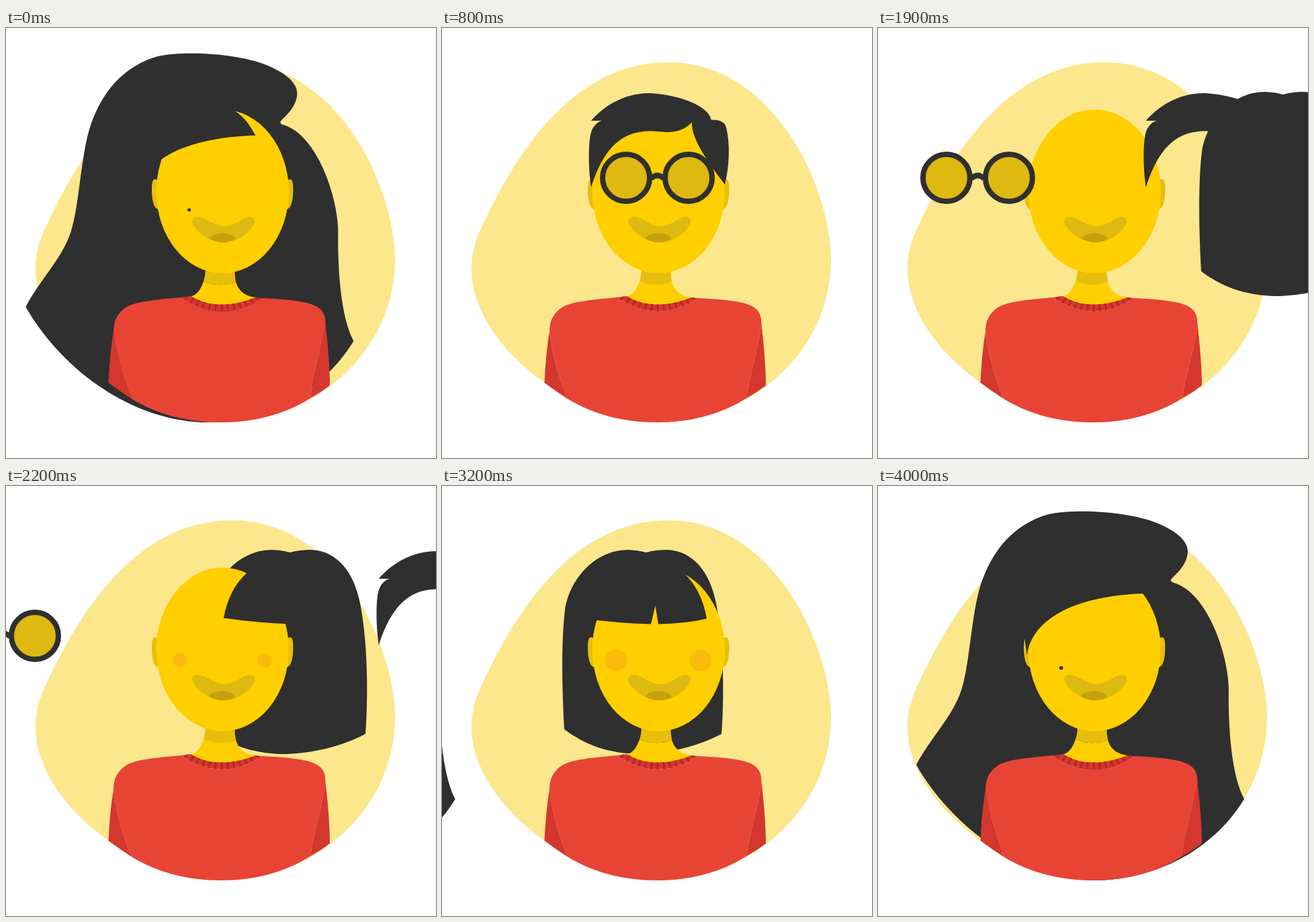
Write an HTML page with a canvas that moves like this. It is 640 by 640 pixels and loops after 4.8 s.

```html
<!DOCTYPE html>
<html lang="en">
<head>
<meta charset="utf-8">
<title>Hairstyles</title>
<style>
html, body { margin: 0; width: 100%; height: 100%; overflow: hidden; background: #fff; }
canvas { display: block; width: 640px; height: 640px; }
</style>
</head>
<body>
<canvas id="stage" width="640" height="640"></canvas>
<script>
const ctx = document.getElementById('stage').getContext('2d');
const path = d => new Path2D(d);

const HAIR = '#2f2f2f', SKIN = '#ffcf00', SHADE = '#e8be0d', MOUTH = '#deb912',
  TONGUE = '#c6a10d', SHIRT = '#e84436', SLEEVE = '#d4372e', RIB = '#b5252a',
  BLOB = '#fce78d', BLUSH = '#fabb0a';

const blob = path('M337 51C495 51 579 240 579 345C579 480 460 587 320 587' +
  'C195 587 44 470 44 360C44 340 47 325 53 310C107 187 195 51 337 51Z');

const body = {
  ear: path('M230 269C220 273 217 256 217 240C217 228 219 225 222 225L230 228Z'),
  neck: path('M294 377Q318 387 342 378C346 390 354 399 372 401L322 420L275 400C286 396 290 388 294 377Z'),
  neckShade: path('M297 355L340 355C340 363 341 370 342 378Q318 387 294 377C296 371 297 365 297 355Z'),
  torso: path('M261 401C225 404 195 407 180 415C165 424 160 437 160 452C164 485 172 515 187 552' +
    'C225 575 270 587 320 587C370 587 415 575 453 551C457 520 470 480 475.5 441' +
    'C476 420 465 412 440 407.500C420 404 400 403 380 402Q322 442 261 401Z'),
  leftSleeve: path('M160 452C156 475 154 500 152.500 528Q170 541 187 552C172 515 164 485 160 452Z'),
  rightSleeve: path('M475.500 441C479 470 482 505 482 532Q468 543 453 551C457 520 470 480 475.500 441Z'),
  collar: path('M261 401L275 399C290 408 305 411.500 321 411.500C340 411.500 356 407 371 401' +
    'L380 402Q322 442 261 401Z'),
  mouth: path('M286 281C297 281 310 295 325 295C342 295 352 281 362 281C369 281 372 286 369 292' +
    'C360 309 341 319 323 319C303 319 285 304 278 292C275 286 280 281 286 281Z'),
  tongue: path('M302 313C309 303 335 302 342 314C336 317 330 319 323 319C315 319 308 317 302 313Z')
};

const longHair = {
  back: path('M57 415C80 372 110 345 124 304C138 262 139 175 158 133C172 98 200 57 254 42' +
    'C300 33 375 39 415 55C440 65 461 80 461 97C461 115 447 128 437 138C435 140 436 143 440 144' +
    'C490 158 521 250 522 300C521 360 526 430 545 466C500 540 415 587 320 587' +
    'C205 582 105 500 57 415Z'),
  front: path('M222 253C225 215 265 165 395 160L399 160C391 145 382 132 369 124' +
    'L322 100L200 120L214 180L218 226Z')
};

const bob = {
  back: path('M205 362C201 290 201 225 206 185C212 140 250 95 300 95Q315 95.500 327 99' +
    'C337 96 347 95 357 95C400 96 422 133 430 170C441 220 444 300 439 369' +
    'C400 390 350 399 316 399C270 398 235 385 205 362Z'),
  front: path('M228 196.500Q280 204 334 205.500L340.500 178L345 205.500Q385 205 417 197.500' +
    'C412 168 400 145 383 130L340 100L300 100L262 130C245 145 233 168 228 196.500Z')
};

const crop = path('M222 138C240 117 270 97 308 97C340 98 395 111 401 137C413 136 421 140 423 148' +
  'C429 172 428 205 421 233C400 205 370 165 372 140Q359 155 335 155C318 154 312 153 300 154' +
  'C255 158 235 197 222 237C218 210 218 180 220 165C222 148 229 141 238 138Z');

const bridge = path('M311 224Q320.500 215 330 224');

function fill(shape, color) {
  ctx.fillStyle = color;
  ctx.fill(shape);
}

function dot(x, y, r, color) {
  ctx.beginPath();
  ctx.arc(x, y, r, 0, 7);
  ctx.fillStyle = color;
  ctx.fill();
}

function shifted(dx, draw) {
  if (dx === null) return;
  ctx.save();
  ctx.translate(dx, 0);
  draw();
  ctx.restore();
}

function drawEars() {
  fill(body.ear, SHADE);
  ctx.save();
  ctx.translate(644.4, 0);
  ctx.scale(-1, 1);
  fill(body.ear, SHADE);
  ctx.restore();
}

function drawCollar() {
  fill(body.collar, SLEEVE);
  ctx.save();
  ctx.clip(body.collar);
  ctx.strokeStyle = RIB;
  ctx.lineWidth = 3;
  ctx.beginPath();
  for (let i = -7; i <= 7; i++) {
    const a = i * 0.118;
    ctx.moveTo(321, 340);
    ctx.lineTo(321 + 120 * Math.sin(a), 340 + 120 * Math.cos(a));
  }
  ctx.stroke();
  ctx.restore();
}

function drawBody() {
  drawEars();
  fill(body.neck, SKIN);
  fill(body.neckShade, SHADE);
  fill(body.torso, SHIRT);
  fill(body.leftSleeve, SLEEVE);
  fill(body.rightSleeve, SLEEVE);
  drawCollar();
  ctx.beginPath();
  ctx.ellipse(322.3, 243.3, 98.6, 121.8, 0, 0, 7);
  ctx.fillStyle = SKIN;
  ctx.fill();
  fill(body.mouth, MOUTH);
  fill(body.tongue, TONGUE);
}

function drawGlasses() {
  ctx.strokeStyle = HAIR;
  ctx.lineWidth = 8;
  for (const x of [274, 367]) {
    dot(x, 223, 35, MOUTH);
    ctx.stroke();
  }
  ctx.stroke(bridge);
}

const STEP = 100, SCENE = 1600, MOVE = 800, LEAD = 40;
const clamp = v => Math.max(0, Math.min(1, v));

// Horizontal offsets (null = off stage) and scales of the face marks.
function pose(time) {
  const t = Math.floor(time / STEP) * STEP % (3 * SCENE);
  const u = clamp((t % SCENE + LEAD) / MOVE);
  const enter = d => (1 - u) * d;
  const leave = d => u < 1 ? u * d : null;
  const grow = clamp(2 * u - 1), shrink = clamp(1 - 2 * u);
  const p = { long: null, crop: null, glasses: null, bob: null, mole: 0, cheeks: 0 };
  return Object.assign(p, [
    () => ({ long: leave(-553), crop: enter(-467), glasses: enter(433), mole: shrink }),
    () => ({ crop: leave(416), glasses: leave(-405), bob: enter(480), cheeks: grow }),
    () => ({ bob: leave(-460), long: enter(-553), cheeks: shrink, mole: grow })
  ][Math.floor(t / SCENE)]());
}

function draw(time) {
  const p = pose(time);
  ctx.fillStyle = '#fff';
  ctx.fillRect(0, 0, 640, 640);
  fill(blob, BLOB);
  shifted(p.long, () => fill(longHair.back, HAIR));
  shifted(p.bob, () => fill(bob.back, HAIR));
  drawBody();
  dot(259, 259, 17.8 * p.cheeks, BLUSH);
  dot(385, 260, 17.8 * p.cheeks, BLUSH);
  dot(272.6, 270.8, 2.8 * p.mole, HAIR);
  shifted(p.long, () => fill(longHair.front, HAIR));
  shifted(p.bob, () => fill(bob.front, HAIR));
  shifted(p.crop, () => fill(crop, HAIR));
  shifted(p.glasses, drawGlasses);
}

const start = performance.now();
function tick() {
  draw(performance.now() - start);
  requestAnimationFrame(tick);
}
tick();
</script>
</body>
</html>
```
